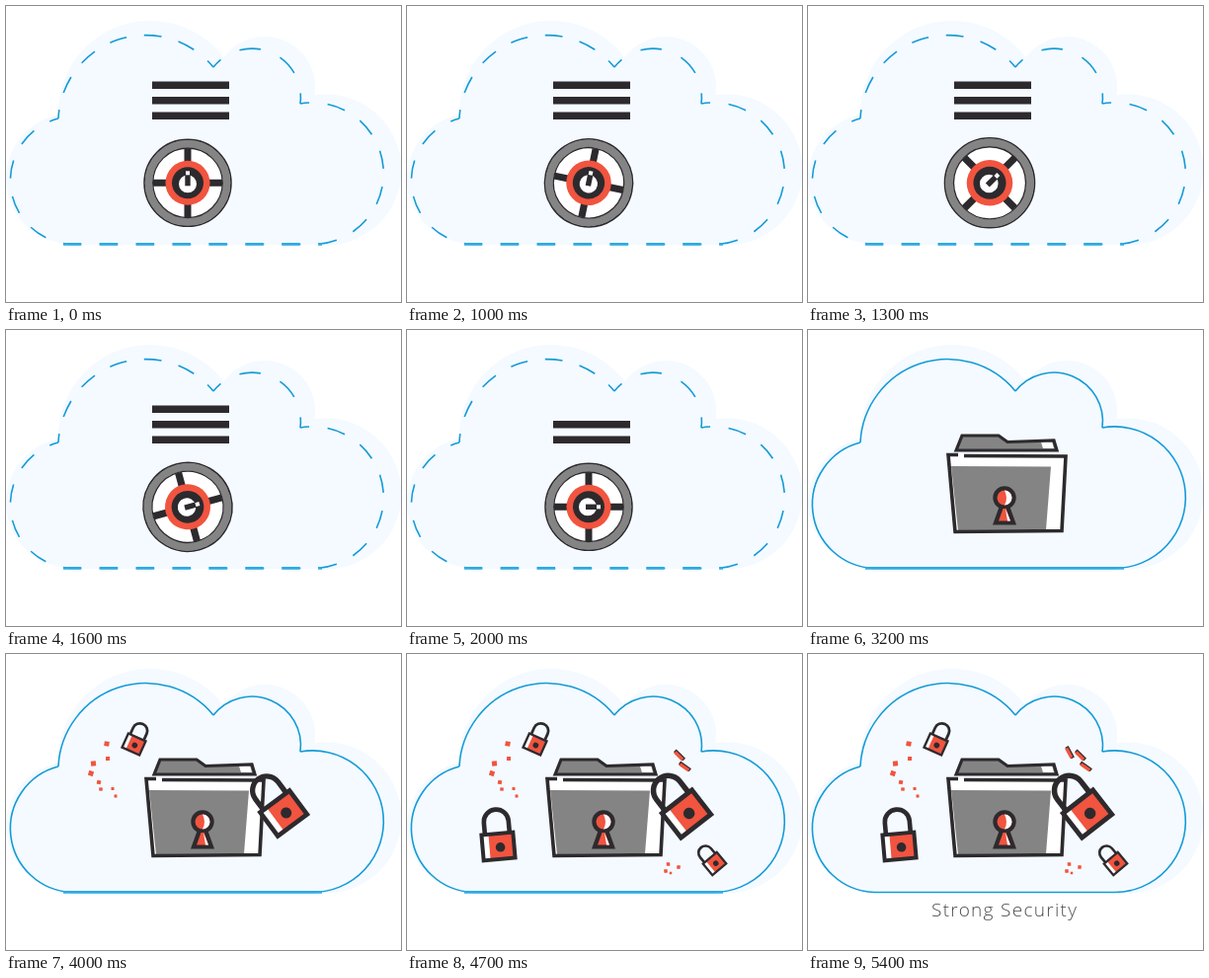
An HTML page that plays this animation: 400 px wide and 300 px high, repeating every 7400 ms.

```html
<!DOCTYPE html>
<html lang="en">
<head>
<meta charset="utf-8">
<title>Strong Security</title>
<style>
  html, body { margin: 0; width: 100%; height: 100%; overflow: hidden; background: #fff; }
  svg { display: block; width: 100vw; height: 100vh; }
  .ink { fill: #2d2a2e; }
  .red { fill: #f1543f; }
  .grey { fill: #848484; }
  .white { fill: #fff; }
  .line { fill: none; stroke: #2d2a2e; }
  #outline { fill: none; stroke: #149bd7; stroke-width: 1.6; }
  text { font: 300 19px "Open Sans", "Noto Sans", sans-serif; letter-spacing: 1.3px; fill: #4d4d4d; }
</style>
</head>
<body>
<svg viewBox="0 0 400 300">
  <defs>
    <g id="lock">
      <path class="line" stroke-width="4.6" d="M-12.5-13V-25a12.5 12.5 0 0 1 25 0V-13"/>
      <rect class="white" x="-17" y="-14" width="34" height="28"/>
      <rect class="red" x="-9" y="-12" width="24" height="24"/>
      <rect class="line" stroke-width="4" x="-16" y="-13" width="32" height="26"/>
      <circle class="ink" cx="2" cy="1" r="4.8"/>
    </g>
    <g id="spark">
      <rect class="red" x="-6" y="-2" width="12" height="4" rx="1"/>
      <path class="line" stroke-width="1.2" d="M-6-1V2H6V-1"/>
    </g>
  </defs>

  <g fill="#f4faff">
    <circle cx="66" cy="175" r="66"/>
    <circle cx="146" cy="108" r="93"/>
    <circle cx="262" cy="82" r="51"/>
    <circle cx="324" cy="166" r="76.5"/>
    <path d="M66 110H324V242H66z"/>
  </g>

  <g id="outline">
    <path pathLength="5" d="M67 241.5A64.8 64.8 0 0 1 53 114"/>
    <path pathLength="6" d="M53 114A88.6 88.6 0 0 1 210 62"/>
    <path pathLength="3" d="M210 62A49.5 49.5 0 0 1 298 99"/>
    <path pathLength="13" d="M67 241.5H310A71.8 71.8 0 1 0 298 99"/>
    <path id="base" pathLength="7.1" stroke="#2eaae3" stroke-width="2.8" d="M58 241.3H320"/>
  </g>

  <g id="bars" class="ink">
    <rect x="148" y="76.5" width="78" height="7.5"/>
    <rect x="148" y="92" width="78" height="7.5"/>
    <rect x="148" y="107.5" width="78" height="7.5"/>
  </g>

  <g id="wheel">
    <circle class="white" r="43"/>
    <circle fill="none" stroke="#848484" stroke-width="7.5" r="39.5"/>
    <circle class="line" stroke-width="1.5" r="44"/>
    <circle class="line" stroke-width="1.3" r="35.3"/>
    <path class="line" stroke-width="7" d="M-35 0H35M0-35V35"/>
    <circle class="red" r="22.5"/>
    <circle class="ink" r="16"/>
    <circle class="white" cy="1" r="9"/>
    <path class="ink" d="M-2.7-9H2.7V3H-2.7z"/>
    <path class="white" d="M-2-12H2V-8H-2z"/>
  </g>

  <g id="behind"></g>

  <g id="folder">
    <path class="grey" d="M150 122L156 107H193L202 113.5 249 112 252 122z"/>
    <path class="white" d="M236 113.5L247 113 249 120H238z"/>
    <path class="line" stroke-width="3.2" d="M150 122L156 107H193L202 113.5 249 112 252 122z"/>
    <path class="white" d="M142 126.5L261 128 257 203.5 149 204.5z"/>
    <path class="grey" d="M145 138L246 138.5 241 202.5 152 203z"/>
    <path class="line" stroke-width="3.6" d="M152 126.5H142L149 204.5 257 203.5 261 128 158 127.5"/>
    <circle class="ink" cx="199" cy="170" r="11.7"/>
    <path class="ink" d="M194 178H204L211 197.5H187z"/>
    <circle class="red" cx="199" cy="170" r="7.5"/>
    <path class="white" d="M199 162.5a7.5 7.5 0 0 1 0 15q4-7 0-15"/>
    <path class="red" d="M197.5 181H200.5L205 193.5H193z"/>
    <path class="white" d="M200 181L205 193.5H202z"/>
  </g>

  <g id="front"></g>
  <g id="dots" class="red"></g>
  <g id="sparks">
    <use href="#spark" transform="translate(281 114.5) rotate(-145)"/>
    <use href="#spark" transform="translate(275.5 103) rotate(-135)"/>
    <use href="#spark" transform="translate(264.5 100) rotate(-118)"/>
  </g>
  <text id="label" x="125" y="265.5">Strong Security</text>
</svg>
<script>
const LOOP = 7400, STEP = 100;
const $ = id => document.getElementById(id);
const show = (el, on) => el.setAttribute("visibility", on ? "visible" : "hidden");
const prog = (t, a, b) => Math.min(1, Math.max(0, (t - a) / (b - a)));
const easeOut = p => 1 - (1 - p) ** 2;

function add(parent, tag, attrs) {
  const el = document.createElementNS("http://www.w3.org/2000/svg", tag);
  for (const k in attrs) el.setAttribute(k, attrs[k]);
  return parent.appendChild(el);
}

// Each lock flies along a quadratic path: start, bend, end
const locks = [
  { from: 3300, to: 3800, x: [125, 92, 129.5], y: [150, 112, 91.5], turn: 24, size: 0.6 },
  { from: 3600, to: 4100, x: [240, 260, 283], y: [172, 155, 162], turn: -38, size: 1.2, layer: "front" },
  { from: 4100, to: 4500, x: [155, 115, 92.5], y: [190, 180, 195], turn: -5, size: 1 },
  { from: 4300, to: 4700, x: [250, 280, 311.5], y: [200, 222, 212.5], turn: -40, size: 0.57 }
];
for (const l of locks) l.el = add($(l.layer || "behind"), "use", { href: "#lock" });

// Trails: x, y, size, in order of appearance
const trails = [
  { from: 3400, dots: [[111, 144, 3], [108, 136.5, 3], [96, 137, 3.5], [94, 130, 4], [86, 121, 5], [88.5, 111, 5], [103, 106, 4], [102, 91, 5]] },
  { from: 4300, dots: [[262, 220, 3.5], [264.5, 213, 3.5], [267, 222, 2.5], [275, 216, 3.5]] }
];
for (const { from, dots } of trails)
  dots.forEach(([x, y, s], i) => {
    const el = add($("dots"), "rect", {
      x: x - s / 2, y: y - s / 2, width: s, height: s, transform: `rotate(${i * 37 % 30 - 10} ${x} ${y})`
    });
    el.from = from + i * 50;
  });

const curve = ([a, b, c], p) => (1 - p) ** 2 * a + 2 * p * (1 - p) * b + p * p * c;

function draw(t) {
  const dash = 0.5 + 0.5 * prog(t, 2600, 3200);
  for (const path of $("outline").children) {
    const shift = path.id === "base" ? 0.244 : 0;
    path.setAttribute("stroke-dasharray", dash < 1 ? `${dash} ${1 - dash}` : "none");
    path.setAttribute("stroke-dashoffset", dash / 2 - shift);
  }
  show($("base"), t < 4800);

  [...$("bars").children].forEach((bar, i) => show(bar, t < 2000 + i * 200));

  const spin = prog(t, 900, 1800);
  const angle = 90 * (1 - (1 - spin) ** 1.18);
  const swell = 1 + 0.035 * Math.sin(Math.PI * spin);
  $("wheel").setAttribute("transform", `translate(184 179.3) rotate(${angle}) scale(${swell})`);
  show($("wheel"), t < 2400);

  const open = easeOut(prog(t, 2600, 3200));
  $("folder").setAttribute("transform", `translate(201 160) scale(${open}) translate(-201 -160)`);
  show($("folder"), open > 0 && t >= 2600);

  for (const l of locks) {
    const p = easeOut(prog(t, l.from, l.to));
    l.el.setAttribute("transform",
      `translate(${curve(l.x, p)} ${curve(l.y, p)}) rotate(${l.turn * p}) scale(${l.size * p})`);
    show(l.el, p > 0);
  }
  for (const dot of $("dots").children) show(dot, t >= dot.from);
  [4500, 4600, 4800].forEach((at, i) => show($("sparks").children[i], t >= at));

  $("label").setAttribute("opacity", prog(t, 4800, 5400));
}

const start = performance.now();
function tick() {
  const t = (performance.now() - start) % LOOP;
  draw(Math.floor(t / STEP) * STEP);
  requestAnimationFrame(tick);
}
tick();
</script>
</body>
</html>
```
